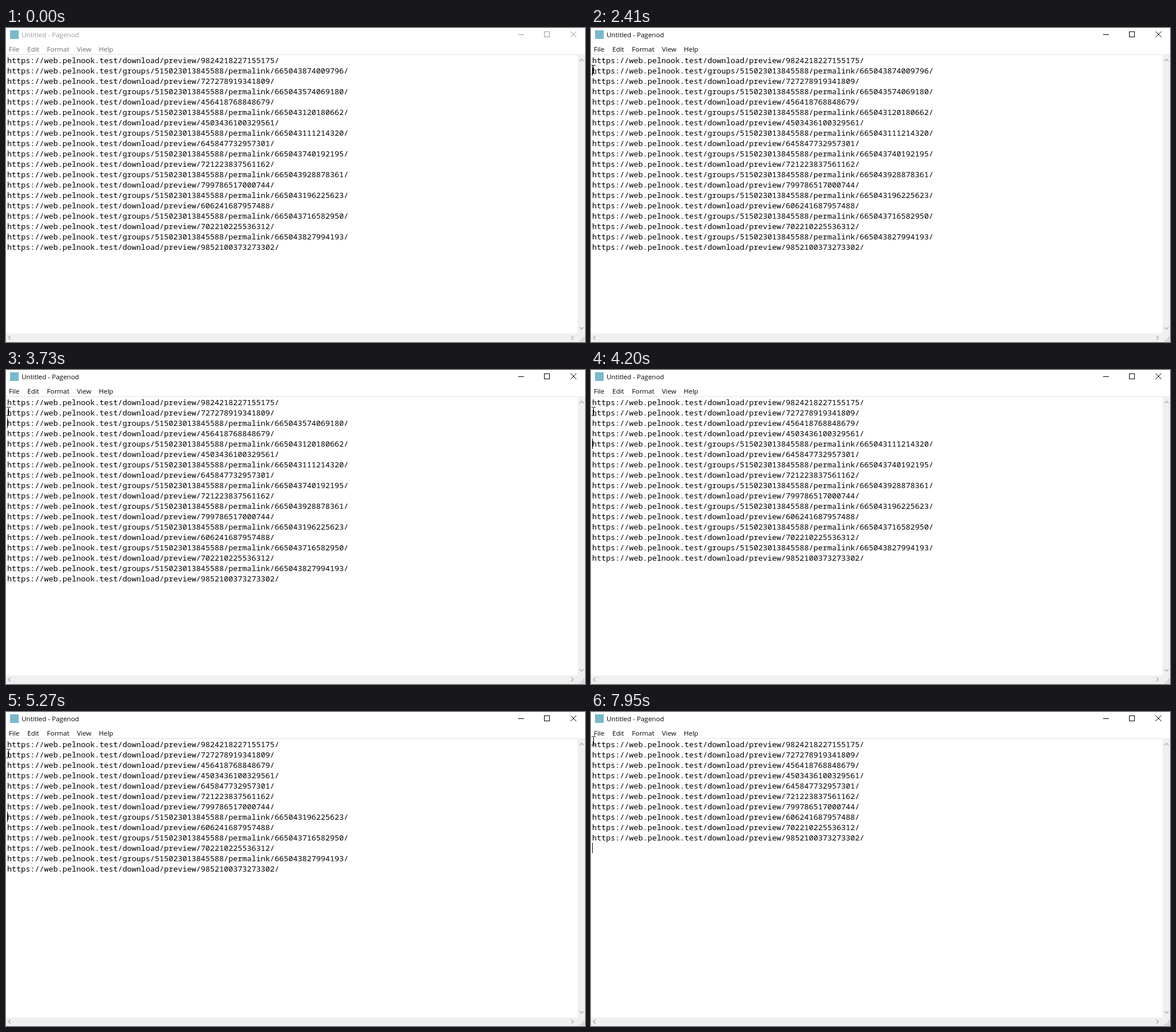
An HTML page with a canvas that plays this animation: 1004 by 545 pixels, repeating every 8000 ms.

```html
<!DOCTYPE html>
<html lang="en">
<head>
<meta charset="utf-8">
<title>Text editor</title>
<style>
  html, body { margin: 0; width: 100%; height: 100%; overflow: hidden; background: #fff; }
  canvas { display: block; }
</style>
</head>
<body>
<canvas id="stage" width="1004" height="545"></canvas>
<script>
const ctx = document.getElementById('stage').getContext('2d');
const LOOP = 8000, TOP = 47, LINE = 18;
const FOCUS_AT = 2410, ENTER_AT = 900, POINTER_STEP = 78.5, BLINK = 545;
const UI_FONT = '11.5px "Open Sans", sans-serif';
const TEXT_FONT = '13.3333px "Noto Sans Mono", monospace';

// Each deletion removes the next group link; the caret steps down with it or just after.
const deleteTimes = [3640, 3960, 4200, 4490, 4810, 5270, 5740, 6160, 6510];
const lateSteps = [0, 4, 7, 8];
const downTimes = deleteTimes.map((time, i) => time + (lateSteps.includes(i) ? 80 : 0));

// Pointer key points: time, centre x, top y.
const pointerPath = [
  [ENTER_AT, 612, 436], [1370, 68, 28], [1530, 30, 51], [1680, 20, 57], [2010, 4, 64],
  [7300, 4, 64], [7560, 4, 26], [7650, 4, 51], [7950, 4, 42]
];

let seed = 90217;
const random = n => (seed = seed * 16807 % 2147483647) % n;
const digits = n => 1 + random(9) + Array.from({ length: n - 1 }, () => random(10)).join('');

const site = 'https://web.pelnook.test/';
const group = digits(15), postPrefix = digits(6);
const links = [];
for (let i = 0; i < 10; i++) {
  const idLength = i === 0 || i % 6 === 3 ? 16 : 15;
  links.push({ text: `${site}download/preview/${digits(idLength)}/`, post: Infinity });
  if (i < 9) links.push({ text: `${site}groups/${group}/permalink/${postPrefix}${digits(9)}/`, post: i });
}

const passed = (times, t) => times.filter(time => time <= t).length;

function rect(color, x, y, w, h) {
  ctx.fillStyle = color;
  ctx.fillRect(x, y, w, h);
}

function label(text, x, y, color, font) {
  ctx.font = font;
  ctx.fillStyle = color;
  ctx.fillText(text, x, y);
  return ctx.measureText(text).width;
}

function path(color, width, ...points) {
  ctx.strokeStyle = color;
  ctx.lineWidth = width;
  ctx.beginPath();
  points.forEach(([x, y]) => ctx.lineTo(x, y));
  ctx.stroke();
}

// A chevron centred on x, y and pointing along dx, dy.
function chevron(x, y, dx, dy) {
  const tip = 1.75, wing = 3.5;
  path('#b4b4b4', 1.7,
    [x - dx * tip + dy * wing, y - dy * tip + dx * wing],
    [x + dx * tip, y + dy * tip],
    [x - dx * tip - dy * wing, y - dy * tip - dx * wing]);
}

function drawWindow(active) {
  const title = active ? '#000' : '#999';
  const menu = active ? '#000' : '#6d6d6d';
  rect('#fff', 0, 0, 1004, 545);
  rect('#79b9cc', 7, 4, 15, 15);
  label('Untitled - Pagenod', 27, 16, title, UI_FONT);
  let x = 5;
  for (const name of ['File', 'Edit', 'Format', 'View', 'Help'])
    x += label(name, Math.round(x), 41, menu, UI_FONT) + 13.5;

  rect(title, 888, 11, 10, 1);
  ctx.strokeStyle = title;
  ctx.lineWidth = 1;
  ctx.strokeRect(933.5, 6.5, 9, 9);
  path(title, 1, [979, 6], [989, 16]);
  path(title, 1, [989, 6], [979, 16]);
}

function drawScrollbars() {
  rect('#f0f0f0', 0, 45, 1004, 2);
  rect('#f0f0f0', 991, 47, 13, 483);
  rect('#f0f0f0', 0, 530, 1004, 15);
  chevron(998, 56, 0, -1);
  chevron(998, 521, 0, 1);
  chevron(6, 537.5, -1, 0);
  chevron(982, 537.5, 1, 0);
  for (let row = 0; row < 3; row++)
    for (let col = 2 - row; col < 3; col++)
      rect('#bfbfbf', 995 + col * 3, 536 + row * 3, 2, 2);
}

function pointerAt(t) {
  const time = ENTER_AT + Math.floor((t - ENTER_AT) / POINTER_STEP) * POINTER_STEP;
  const next = pointerPath.findIndex(p => p[0] > time);
  if (next < 0) return pointerPath.at(-1).slice(1);
  const [t0, ...from] = pointerPath[next - 1];
  const [t1, ...to] = pointerPath[next];
  const ease = 1 - (1 - (time - t0) / (t1 - t0)) ** 2;
  return from.map((v, i) => Math.round(v + (to[i] - v) * ease));
}

function drawPointer(t) {
  if (t < ENTER_AT) return;
  const [x, y] = pointerAt(t);
  rect('#000', x, y + 1, 1, 14);
  for (const edge of [y, y + 15]) {
    rect('#000', x - 3, edge, 3, 1);
    rect('#000', x + 1, edge, 3, 1);
  }
}

function drawCaret(t) {
  if (t < FOCUS_AT) return;
  const steps = passed(downTimes, t);
  const since = t - (steps ? downTimes[steps - 1] : FOCUS_AT);
  if (Math.floor(since / BLINK) % 2 === 0)
    rect('#000', 2, TOP + LINE * (1 + steps), 1, LINE);
}

function draw(t) {
  drawWindow(t >= FOCUS_AT);
  drawScrollbars();
  const removed = passed(deleteTimes, t);
  links.filter(link => link.post >= removed)
    .forEach((link, row) => label(link.text, 2, TOP + 14 + row * LINE, '#000', TEXT_FONT));
  drawCaret(t);
  drawPointer(t);
}

const start = performance.now();
function tick() {
  draw((performance.now() - start) % LOOP);
  requestAnimationFrame(tick);
}
tick();
</script>
</body>
</html>
```
